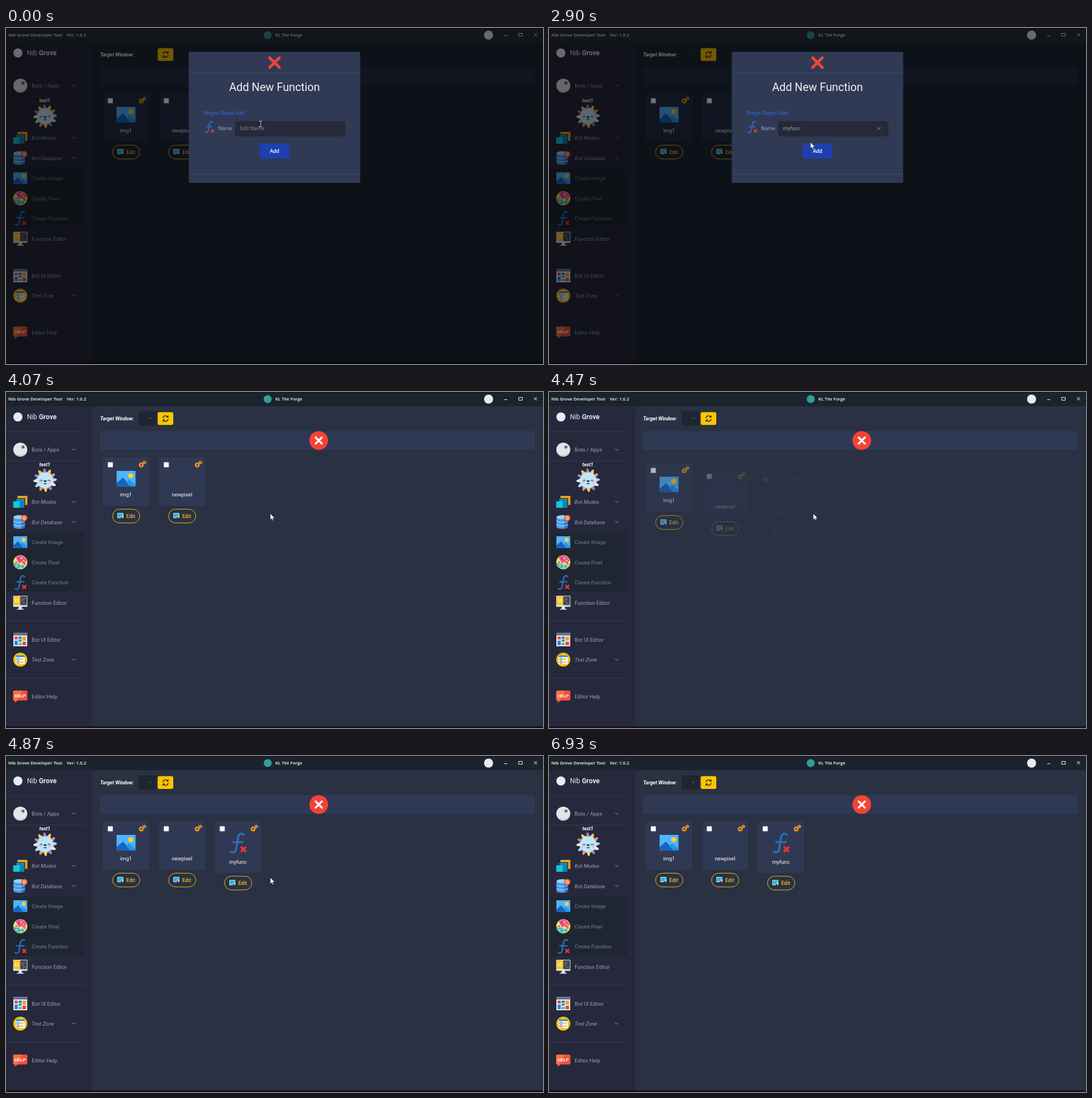
An HTML page that plays this animation: 947 by 592 pixels, repeating every 7.86 s.

```html
<!DOCTYPE html>
<html lang="en">
<head>
<meta charset="utf-8">
<title>Add New Function</title>
<style>
  html, body { margin: 0; width: 100%; height: 100%; overflow: hidden; background: #1b242d; }
  svg { display: block; --bar: #1b242d; --main: #293143; --card: #303954; }
  svg.dimmed { --bar: #272f37; --main: #1d2838; --card: #242e49; }
  text { font: 9.24px Roboto, sans-serif; fill: #94a3b8; white-space: pre; }
  .bar { font: 600 7.8px "Open Sans", sans-serif; fill: #fff; }
  .mid { text-anchor: middle; }
  .white { fill: #fff; }
  .medium { font-weight: 500; }
  .italic { font-style: italic; }
  .bold { font-weight: 700; }
  .sub { fill: #717e94; }
  .stroke { fill: none; stroke-linecap: round; stroke-linejoin: round; }
</style>
</head>
<body>
<svg id="stage" width="947" height="592" viewBox="0 0 947 592">
  <defs>
    <path id="cross" class="stroke" d="M-1-1 1 1M1-1-1 1" vector-effect="non-scaling-stroke"/>
    <path id="chevron" class="stroke" d="M-2.7-1.4 0 1.4 2.7-1.4" stroke="#94a3b8"/>

    <g id="picture">
      <path fill="#4fb4fb" d="M-12.2-10.3h24.4v20.6h-24.4z"/>
      <circle cx="6" cy="-4" r="3.4" fill="#ffd02e"/>
      <path fill="#1565c0" d="M-12.2 6-4-1.500 7 10.3h-19.2z"/>
      <path fill="#2196f3" d="M0 4.500 4 1 12.2 8v2.3H5.400z"/>
    </g>
    <g id="fx">
      <path class="stroke" stroke="#2e6cb8" stroke-width="2.5" d="M7.5-10.5C4-13 1-11 .3-7L-2.2 8C-3 12-6 12.600-9 11M-6-1H6"/>
      <path class="stroke" stroke="#e5392f" stroke-width="2.6" d="M4.500 5.500l5 5m0-5-5 5"/>
    </g>
    <g id="gears" fill="none" stroke="#f79a1c">
      <circle cx="-2" cy="1.500" r="2.600" stroke-width="2"/>
      <circle cx="-2" cy="1.500" r="4" stroke-width="1.500" stroke-dasharray="1.600 1.540"/>
      <circle cx="3.500" cy="-3" r="1.700" stroke-width="1.600"/>
      <circle cx="3.500" cy="-3" r="2.700" stroke-width="1.200" stroke-dasharray="1.200 1.220"/>
    </g>
    <g id="moon">
      <circle r="12.300" fill="#e2e6ea"/>
      <path d="M-10 7A12.300 12.300 0 0 0 12 3 16 16 0 0 1-10 7" fill="#c5ccd3"/>
      <circle cx="4.500" cy="-4.500" r="3.600" fill="#aab3bd"/><circle cx="5" cy="-4.500" r="2" fill="#4b5563"/>
    </g>
    <g id="modes">
      <path fill="#ff9f1a" d="M-5-10.500h17.500v16h-4v-12H-5z"/>
      <path fill="#0891b2" d="M-7-5.500H7v14H-7z"/>
      <path fill="#16c5da" d="M-12.500-1H-1v11.500h-11.500z"/><path fill="#0e7fbf" d="M-1-1h8v11.500h-8z"/>
    </g>
    <g id="database">
      <path fill="#4a9be8" d="M-12-8v17c0 4 20 4 20 0V-8z"/>
      <path fill="#2d72c4" d="M2-6h6V9c0 1.500-3 2.500-6 2.800z"/>
      <ellipse cx="-2" cy="-8.500" rx="10" ry="3.500" fill="#9bd0fb"/>
      <path class="stroke" stroke="#c7e5ff" d="M-12-2c0 4 20 4 20 0M-12 4c0 4 20 4 20 0"/>
      <circle cx="7" cy="-7" r="5.500" fill="#f4623a"/>
      <circle cx="7" cy="-7" r="2.200" fill="none" stroke="#ffe0d0" stroke-width="1.300"/>
    </g>
    <g id="pixel">
      <circle r="12.400" fill="#f6dc6b"/>
      <path fill="#ef4f8c" d="M-8-9A12 12 0 0 1 11-3L6 3 2-1-2 2-5-3z"/>
      <path fill="#35b9d6" d="M-12 0-7 3-3 2 0 6l5-2 3 4A12 12 0 0 1-12 0"/>
      <g fill="#fff0a0"><circle cx="2" cy="-7" r="1.400"/><circle cx="6" cy="-3" r="1.200"/><circle cx="-6" cy="6" r="1.300"/><circle cx="1" cy="9" r="1.300"/></g>
      <g fill="#7b3fa0"><circle cx="-3" cy="-6" r="1.300"/><circle cx="-7" cy="0" r="1.300"/><circle cx="8" cy="3" r="1.300"/></g>
    </g>
    <g id="monitor">
      <path fill="#dce3ea" d="M-12.500-12h25V7.500h-25zM-3 7.500h6V11h3v1.500H-6V11h3z"/>
      <path fill="#ffc21a" d="M-11.500-11H0V4.500h-11.500z"/><path fill="#39414f" d="M0-11h11.500V4.500H0z"/>
      <path class="stroke" stroke="#fff" stroke-width="1.300" d="M-8-7v6M-4-7v6"/>
      <path class="stroke" stroke="#e85b4f" d="M2-8h3m2 0h2M2-2h4"/><path class="stroke" stroke="#54b4d8" d="M2-5h5M5 1h4"/>
    </g>
    <g id="window">
      <path fill="#e8edf2" d="M-12.200-12h24.400v24h-24.400z"/><path fill="#64748b" d="M-12.200-12h24.400v5h-24.400z"/>
      <path fill="#e5483c" d="M-10-5h5.500v5H-10zM4 4h6v6H4z"/><path fill="#ff9f1a" d="M4-5h6v7H4z"/>
      <path fill="#2f7de1" d="M-10 2h5.500v8H-10zM-3-5h5.500v4H-3z"/><path fill="#2fae66" d="M-3 0h5.500v4H-3z"/><path fill="#8c9aab" d="M-3 6h5.500v4H-3z"/>
    </g>
    <g id="zone">
      <circle r="12.300" fill="#ffc107"/>
      <path fill="#eef6fd" d="M-8-7.500H8V8H-8z"/><path fill="#3f8de0" d="M-8-7.500H8v3H-8z"/>
      <circle cx="-4" cy="-1" r="2" fill="none" stroke="#23a06b" stroke-width="1.200"/>
      <circle cx="-4" cy="4.500" r="2" fill="none" stroke="#e5483c" stroke-width="1.200"/>
      <path class="stroke" stroke="#ff9f1a" stroke-width="1.400" d="M0-1h5M0 4.500h5"/>
    </g>
    <g id="help">
      <path fill="#f4503a" d="M-10.500-10.500h21q2 0 2 2V5q0 2-2 2H-4l-6 4V7h-.5q-2 0-2-2V-8.500q0-2 2-2"/>
      <path fill="#ff7043" d="M-10.500-10.500H3L-6 7h-4.500q-2 0-2-2V-8.500q0-2 2-2"/>
      <text class="mid bold white" y="1.200" style="font-size:8px">HELP</text>
    </g>

    <path id="arrow" fill="#fff" stroke="#111" stroke-width=".6" d="M0 0v11.200l2.600-2.300 1.700 3.900 1.700-.8-1.700-3.700h3.500z"/>
    <path id="hand" fill="#fff" stroke="#111" stroke-width=".7" stroke-linejoin="round" d="M-1.200 9V1Q0-.8 1.200 1v4.200q1.500-.8 2 .4 1.500-.6 2 .5 1.700-.4 1.700 1.200V11q0 2-1.400 3.600H0L-3.400 9.500Q-3.600 7.400-1.200 9z"/>
    <path id="ibeam" class="stroke" stroke="#e5e9f0" stroke-width=".8" d="M-2.600-5h2l.6.600.6-.600h2M0-4.400v9M-2.600 5h2l.6-.600.6.600h2"/>
  </defs>

  <rect width="947" height="592" fill="#25293b"/>
  <path d="M152 592V35q0-10 10-10h785v567z" style="fill:var(--main)"/>
  <rect width="947" height="25" style="fill:var(--bar)"/>
  <path d="M0 .5h947" stroke="#10161c"/>
  <text class="bar" x="4" y="15">Nib Grove Developer Tool</text>
  <text class="bar" x="107" y="15">Ver: 1.0.2</text>
  <circle cx="461.500" cy="12.500" r="7" fill="#2f9f9a"/>
  <text class="bar" x="475" y="15">KL Tile Forge</text>
  <circle cx="851" cy="12.500" r="8" fill="#e8ebf1"/>
  <g class="stroke" stroke="#fff"><path d="M879 13.500h4.500"/><path d="M904.500 9.500h6v5h-6z"/><path d="M931.300 9.500l5 5m0-5-5 5"/></g>

  <circle cx="21" cy="44" r="8" fill="#e8ebf1"/>
  <text x="37" y="48" style="font-size:11.9px;fill:#e2e8f0">Nib <tspan class="bold">Grove</tspan></text>
  <path d="M0 69.500h138M0 121.500h138M0 403.500h138M0 504.500h138" stroke="#343b50"/>
  <path d="M0 248h135q3 0 3 3v98q0 3-3 3H0z" fill="#202631"/>
  <g id="menu"></g>
  <text class="mid bold italic white" x="68.500" y="131.300" style="font-size:8.700px">test1</text>
  <g id="avatar" transform="translate(69 155.500)"></g>

  <text class="bold italic white" x="166" y="50" style="font-size:8.800px">Target Window:</text>
  <rect x="234" y="33.500" width="31" height="26" rx="3" fill="#202631"/>
  <use href="#chevron" x="254.500" y="46.500" opacity=".5"/>
  <rect x="267.500" y="35.500" width="27.500" height="22.500" rx="3" fill="#fdc500"/>
  <path class="stroke" stroke="#222" stroke-width="1.300" d="M277 45.500a4.600 4.600 0 0 1 8.500-1.300m.4-2.600v2.800h-2.800M285.900 48a4.600 4.600 0 0 1-8.500 1.300m-.4 2.600v-2.800h2.800"/>
  <rect x="166" y="69" width="766.500" height="33" rx="3" style="fill:var(--card)"/>
  <g id="clearAll">
    <circle cx="551.500" cy="85.500" r="16.500" fill="#f44336"/>
    <use href="#cross" transform="translate(551.500 85.500) scale(5.500)" stroke="#fff" stroke-width="3.200"/>
  </g>
  <g id="cards"></g>
  <path d="M0 590.500h947" stroke="#170f1f" stroke-width="3"/>

  <g id="modal">
    <rect width="947" height="592" opacity=".55"/>
    <rect x="322.300" y="42" width="302.300" height="230.700" rx="2" fill="#303a55"/>
    <path d="M322.300 79.500h302.300M322.300 257.500h302.300" stroke="#3f4a66"/>
    <use href="#cross" transform="translate(473.500 61) scale(8.500)" stroke="#f44336" stroke-width="5" style="stroke-linecap:butt"/>
    <text class="mid" x="473.500" y="111" style="font-size:19.700px;fill:#eef1f6">Add New Function</text>
    <text x="348" y="152.700" style="fill:#2f6af0">Single Object Add</text>
    <use href="#fx" transform="translate(358.500 174.500) scale(.82)"/>
    <text x="374" y="179.700">Name</text>
    <rect x="404" y="164" width="194.500" height="27" rx="4" fill="#252938"/>
    <text id="field" x="412.800" y="180.300"></text>
    <rect id="caret" y="172" width="1" height="11" fill="#d5dbe6"/>
    <use id="clear" href="#cross" transform="translate(582 177.300) scale(2.700)" stroke="#7f8b9e"/>
    <rect x="447.300" y="204" width="52.200" height="26" rx="2.500" fill="#1e40af"/>
    <text class="mid medium white" x="473.500" y="220.300">Add</text>
  </g>
  <use id="cursor"/>
</svg>
<script>
const LOOP = 7860, CLOSE = 4070, RELOAD = 4200, BLUR = 3900;
const byId = id => document.getElementById(id);
const clamp = v => Math.min(1, Math.max(0, v));
const ramp = (t, from, to) => clamp((t - from) / (to - from));

// Sidebar: icon, label, y, text classes, chevron
byId('menu').innerHTML = [
  ['moon', 'Bots / Apps', 101.5, '', 1],
  ['modes', 'Bot Modes', 193.5, 'italic', 1],
  ['database', 'Bot Database', 229, 'italic', 1],
  ['picture', 'Create Image', 264.5, 'sub'],
  ['pixel', 'Create Pixel', 300, 'sub'],
  ['fx', 'Create Function', 335.5, 'sub'],
  ['monitor', 'Function Editor', 371, ''],
  ['window', 'Bot UI Editor', 436, ''],
  ['zone', 'Test Zone', 471.5, 'italic', 1],
  ['help', 'Editor Help', 536.5, '']
].map(([icon, label, y, style, chevron]) => `
  <use href="#${icon}" x="25.200" y="${y}"/>
  <text class="${style}" x="45.300" y="${y + 3.5}">${label}</text>
  ${chevron ? `<use href="#chevron" x="119.500" y="${y}"/>` : ''}`).join('');

const petals = ['#9b7fd1', '#f2d24e', '#f08a8a', '#a8dcf5', '#f6ead0'];
byId('avatar').innerHTML = Array.from({ length: 12 }, (_, i) =>
  `<path fill="${petals[i % 5]}" d="M-5-10-2.500-20.500H0L5-10z" transform="rotate(${i * 30})"/>`).join('') + `
  <circle r="14" fill="#bfe5f8"/>
  <circle cx="-8" cy="3.500" r="2" fill="#f4b6c4"/><circle cx="8" cy="3.500" r="2" fill="#f4b6c4"/>
  <path class="stroke" stroke="#26313f" stroke-width="1.200" d="M-9 1q2-3 4 0M5 1q2-3 4 0M-2 5.500q2 2 4 0"/>
  <ellipse cy="1.500" rx="2.400" ry="1.700" fill="#26313f"/>`;

byId('cards').innerHTML = ['img1', 'newpixel', 'myfunc'].map((name, i) => {
  const extra = i === 2 ? 5.3 : 0;
  const icon = ['<use href="#picture" transform="translate(40.700 37.500) scale(1.370 1.320)"/>', '',
    '<use href="#fx" transform="translate(40.500 38) scale(1.400)"/>'][i];
  return `<g><g>
    <rect width="81.500" height="${85.5 + extra}" rx="4" style="fill:var(--card)"/>
    <rect x="8.500" y="8.500" width="9" height="9" rx="1" fill="#fff" stroke="#767676" stroke-width=".6"/>
    <use href="#gears" x="69.500" y="12"/>${icon}
    <text class="mid white" x="40.700" y="${69.2 + extra}">${name}</text></g>
    <g><rect x="17" y="${91.3 + extra}" width="48" height="24.200" rx="12.100" fill="none" stroke="#f5bd0c"/>
    <g transform="translate(25.500 ${98 + extra})"><path fill="#e9f2f8" d="M0 0h10.500v9H0z"/><path fill="#18b4d0" d="M1 1h8.500v5L7 4 4 8H1z"/><path fill="#17405e" d="M6 5l4 4H6z"/></g>
    <text class="medium" x="41" y="${106.7 + extra}" style="fill:#f9b81a">Edit</text></g></g>`;
}).join('');
const cards = [...byId('cards').children];

function drawCards(t) {
  cards.forEach((card, i) => {
    let p = ramp(t, RELOAD + i * 100, RELOAD + 470 + i * 100);
    p = p < .5 ? 2 * p * p : 1 - 2 * (1 - p) ** 2;
    if (t < RELOAD) p = i < 2 ? 1 : 0;
    const moving = t >= RELOAD && t < 4850;
    card.setAttribute('opacity', p);
    card.setAttribute('transform', `translate(${171 + i * 98.7} ${115.2 + 28 * (1 - p)})`);
    card.lastElementChild.setAttribute('transform', `translate(0 ${moving ? 1.3 : 0})`);
  });
}

// The first entry only sets the blink phase before any key is pressed.
const keyTimes = [-890, 330, 600, 1130, 1370, 1900, 2030];
const field = byId('field'), caret = byId('caret');

function drawField(t) {
  const count = keyTimes.filter(k => k <= t).length - 1;
  const blink = (t - keyTimes[count]) % 1040;
  field.textContent = count ? 'myfunc'.slice(0, count) : 'Edit Name';
  field.style.fill = count ? '#94a3b8' : '#7c8493';
  caret.setAttribute('x', 413 + (count ? field.getComputedTextLength() : 0));
  caret.setAttribute('opacity', t < BLUR ? 1 - ramp(blink, 400, 570) + ramp(blink, 900, 1040) : 0);
  byId('clear').setAttribute('opacity', count && t < BLUR ? 1 : 0);
}

// Pointer path: time, x, y
const path = [
  [0, 449, 169], [2770, 449, 169], [2900, 461, 201], [3060, 470, 215], [3230, 466, 214],
  [5570, 466, 214], [5830, 422, 187.5], [6100, 422, 187.5], [6200, 412.5, 187.5],
  [6570, 412.5, 187.5], [6930, 11, 600], [LOOP, 11, 600]
];
const within = (x, y, l, t, r, b) => x > l && x < r && y > t && y < b;

function drawCursor(t) {
  const i = path.findIndex(p => p[0] > t);
  const [t0, x0, y0] = path[i - 1], [t1, x1, y1] = path[i];
  const p = (t - t0) / (t1 - t0);
  const x = x0 + (x1 - x0) * p, y = y0 + (y1 - y0) * p;
  const open = t < CLOSE;
  let shape = 'arrow';
  if (open && within(x, y, 404, 164, 598, 191)) shape = 'ibeam';
  else if (open ? within(x, y, 447, 204, 500, 230) : within(x, y, 368, 115, 450, 206)) shape = 'hand';
  const cursor = byId('cursor');
  cursor.setAttribute('href', '#' + shape);
  cursor.setAttribute('transform', `translate(${x} ${y})`);
}

const start = performance.now();
function frame(now) {
  const t = Math.max(0, now - start) % LOOP, open = t < CLOSE;
  byId('stage').classList.toggle('dimmed', open);
  byId('modal').style.display = open ? '' : 'none';
  byId('clearAll').style.display = open ? 'none' : '';
  drawCards(t);
  if (open) drawField(t);
  drawCursor(t);
  requestAnimationFrame(frame);
}
requestAnimationFrame(frame);
</script>
</body>
</html>
```
